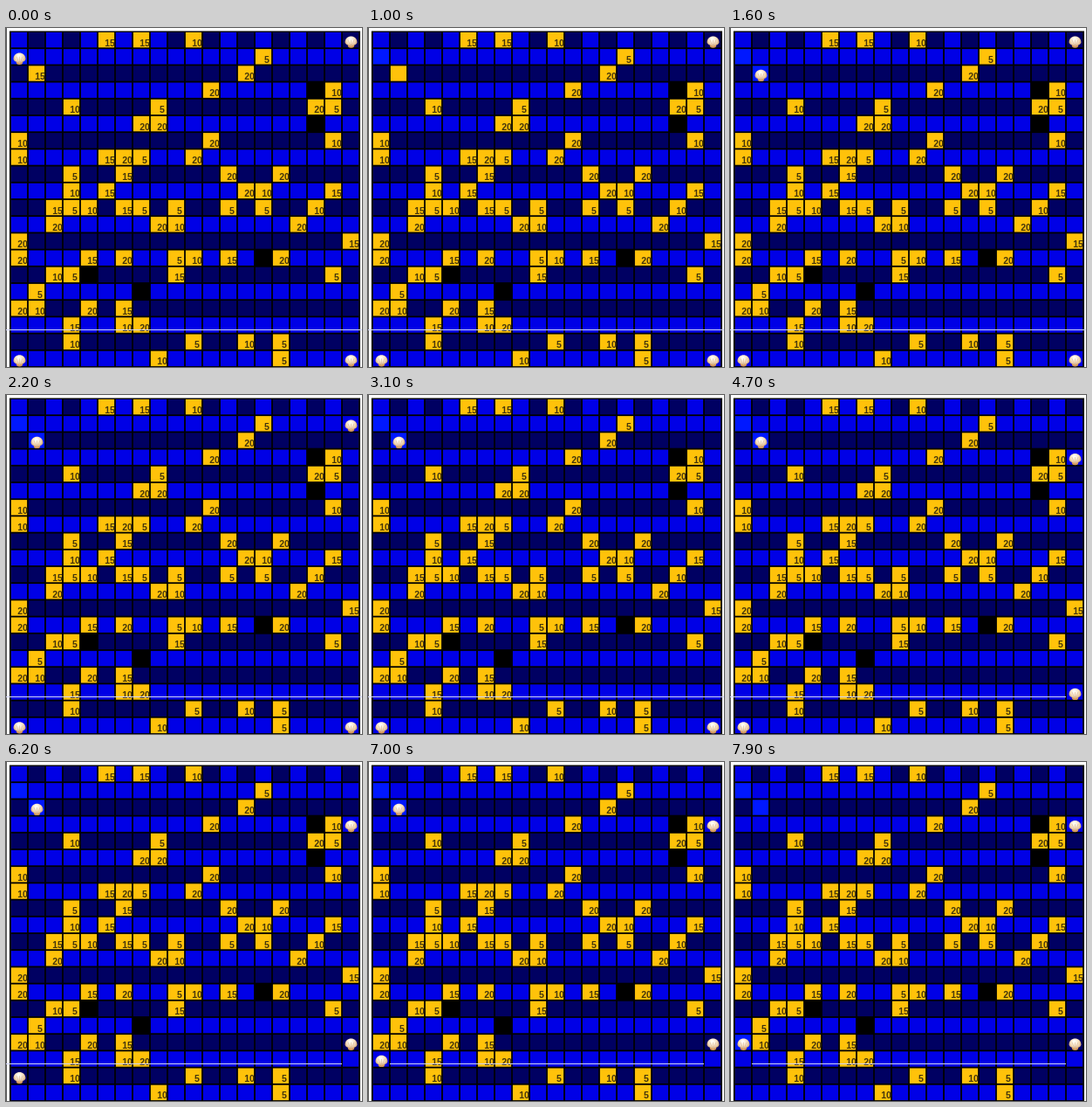
Write an HTML page with a canvas that moves like this. It is 408 by 388 pixels and loops after 8 s.

```html
<!DOCTYPE html>
<html lang="en">
<head>
<meta charset="utf-8">
<title>Treasure board</title>
<style>
html, body { margin: 0; width: 100%; height: 100%; overflow: hidden; background: #fff; }
canvas { display: block; }
</style>
</head>
<body>
<canvas id="stage" width="408" height="388"></canvas>
<script>
const ctx = document.getElementById('stage').getContext('2d');
const LOOP = 8000, X0 = 5, Y0 = 4, W = 20, H = 19.2;
const BRIGHT = '#0000e6', NAVY = '#000062', GOLD = '#ffc20a', CLEARED = '#0018ff';
const LINE_ROW = 17, LINE_Y = 345;

// Hops follow each other at an even beat; a pearl is away for the first part
const FIRST = 275, BEAT = 675, AWAY = 330;

// a-d: treasures worth 5, 10, 15, 20; e: emptied treasure; x: hole
const board = [
  '.....c.c..b.........',
  'e.............a.....',
  '.c...........d......',
  '...........d.....xb.',
  '...b....a........da.',
  '.......dd........x..',
  'b..........d......b.',
  'b....cda..d.........',
  '...a..c.....d..d....',
  '...b.c.......db...c.',
  '..cab.ca.a..a.a..b..',
  '..d.....db......d...',
  'd..................c',
  'd...c.d..ab.c.xd....',
  '..bax....c........a.',
  '.a.....x............',
  'db..d.c.............',
  '...c..bd............',
  '...b......a..b.a....',
  '........b......a....'
];
const worth = { a: 5, b: 10, c: 15, d: 20 };

const homes = [[0, 1], [19, 0], [19, 19], [0, 19]];

// player, column, row
const hops = [
  [0, 0, 2], [0, 1, 2],
  [1, 19, 1], [1, 19, 2], [1, 19, 3],
  [2, 19, 18], [2, 19, 17], [2, 19, 16],
  [3, 0, 18], [3, 0, 17], [3, 0, 16],
  [0, 2, 2]
].map(([player, c, r], i) => ({ player, c, r, leave: FIRST + i * BEAT }));

const hopTo = (c, r) => hops.find(h => h.c === c && h.r === r);

function cell(c, r, color) {
  ctx.fillStyle = color;
  ctx.fillRect(X0 + c * W + 0.9, Y0 + r * H + 0.9, W - 1.8, H - 1.8);
}

function label(c, r, value) {
  ctx.fillStyle = '#44360c';
  ctx.fillText(value, X0 + c * W + 14, Y0 + r * H + 16.5);
}

function drawCell(c, r, t) {
  const kind = board[r][c], value = worth[kind];
  if (kind === 'x') return;
  const light = r ? r % 2 : c % 2 === 0;
  const plain = light ? BRIGHT : NAVY;
  const hop = hopTo(c, r);
  const claimed = hop && t >= hop.leave;
  const reached = hop && t >= hop.leave + AWAY;
  if (kind === 'e' || value && reached) cell(c, r, CLEARED);
  else cell(c, r, value ? GOLD : plain);
  if (value && !claimed) label(c, r, value);
}

function drawBoard(t) {
  ctx.fillStyle = '#fff';
  ctx.fillRect(0, 0, 408, 388);
  ctx.fillStyle = '#555';
  ctx.fillRect(0, 0, 1, 388);
  ctx.fillStyle = '#000';
  ctx.fillRect(4, 3.5, 402, 384.5);
  ctx.font = 'bold 10.5px "Liberation Sans", Arial, sans-serif';
  ctx.textAlign = 'center';
  for (let r = 0; r < 20; r++)
    for (let c = 0; c < 20; c++) drawCell(c, r, t);
}

// Repainting an end cell wipes the line there
function drawLine(t) {
  const wiped = c => t >= hopTo(c, LINE_ROW).leave;
  const left = wiped(0) ? X0 + W : 0;
  const right = wiped(19) ? X0 + 19 * W : 408;
  ctx.fillStyle = '#d2d6fa';
  ctx.fillRect(left, LINE_Y, right - left, 1);
}

function pearl(c, r) {
  const x = X0 + c * W + 10.5, y = Y0 + r * H + 11.5;
  ctx.fillStyle = '#d69a5c';
  ctx.beginPath();
  ctx.ellipse(x, y + 4, 3.8, 3.2, 0, 0, 2 * Math.PI);
  ctx.fill();
  const shade = ctx.createRadialGradient(x - 1, y - 3, 1, x, y - 1, 7.5);
  shade.addColorStop(0, '#fffdf5');
  shade.addColorStop(0.55, '#f6e0c3');
  shade.addColorStop(1, '#cfa271');
  ctx.fillStyle = shade;
  ctx.beginPath();
  ctx.moveTo(x - 7, y + 1);
  ctx.bezierCurveTo(x - 7, y - 8.5, x + 7, y - 8.5, x + 7, y + 1);
  ctx.quadraticCurveTo(x + 6, y + 4, x + 3, y + 4);
  ctx.lineTo(x, y + 5.5);
  ctx.lineTo(x - 3, y + 4);
  ctx.quadraticCurveTo(x - 6, y + 4, x - 7, y + 1);
  ctx.fill();
  ctx.strokeStyle = 'rgba(176, 124, 76, 0.4)';
  ctx.lineWidth = 0.7;
  ctx.beginPath();
  for (const k of [-1, 0, 1]) {
    ctx.moveTo(x + k, y + 4.5);
    ctx.lineTo(x + k * 3.5, y - 2);
  }
  ctx.stroke();
}

function drawPearl(home, player, t) {
  const last = hops.filter(h => h.player === player && t >= h.leave).pop();
  if (!last) pearl(...home);
  else if (t >= last.leave + AWAY) pearl(last.c, last.r);
}

function frame(now) {
  const t = now % LOOP;
  drawBoard(t);
  drawLine(t);
  homes.forEach((home, i) => drawPearl(home, i, t));
  requestAnimationFrame(frame);
}
requestAnimationFrame(frame);
</script>
</body>
</html>
```
